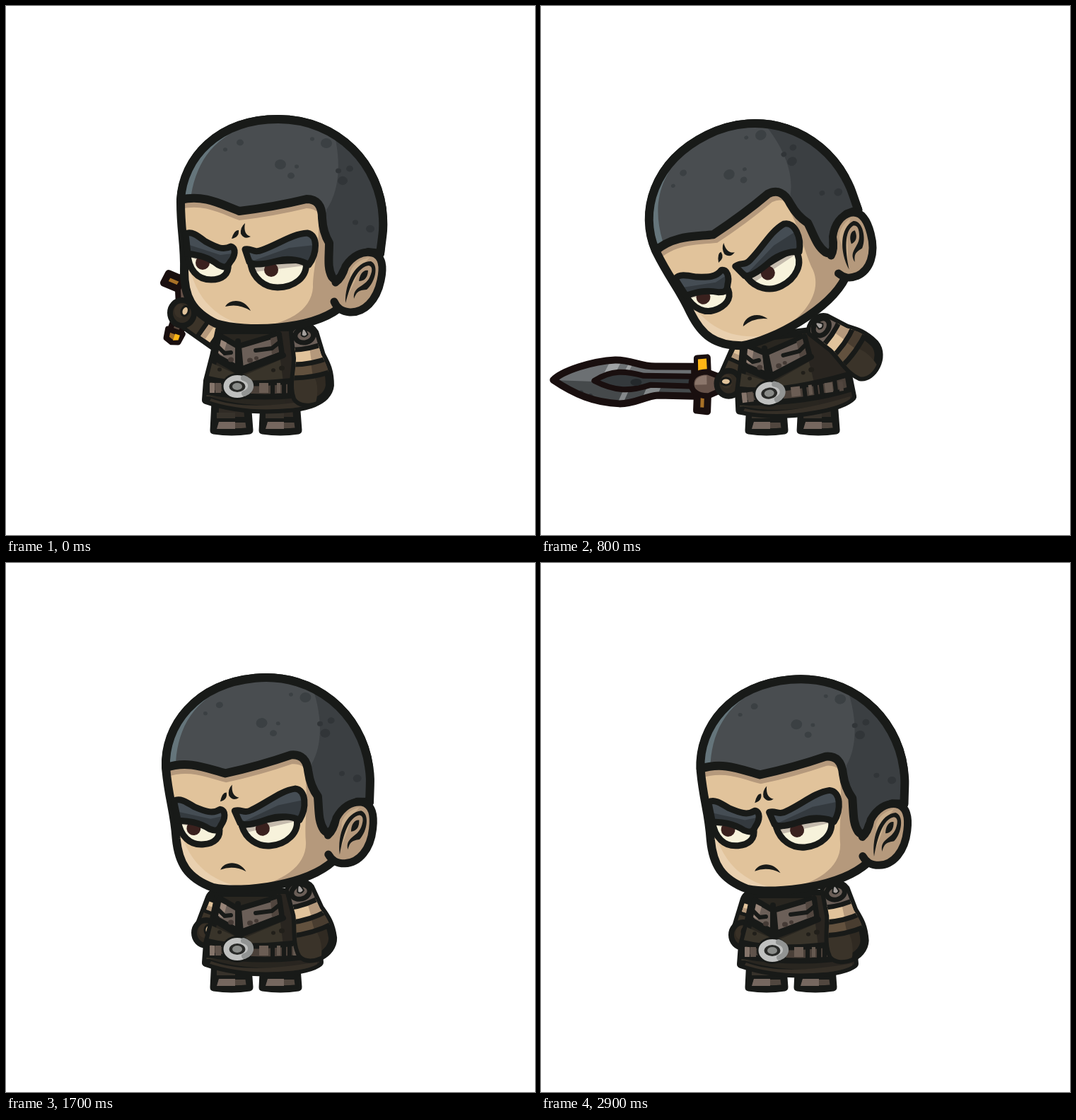
An HTML page with a canvas for the animation above (3 s loop, 748 by 748 pixels).

```html
<!DOCTYPE html>
<html>
<head>
<meta charset="utf-8">
<style>
html, body { margin: 0; width: 100%; height: 100%; overflow: hidden; background: #fff; }
canvas { display: block; width: 748px; height: 748px; }
</style>
</head>
<body>
<canvas id="stage" width="748" height="748"></canvas>
<script>
const ctx = document.getElementById('stage').getContext('2d');
const INK = '#181a18', SKIN = '#e1c39b', SKIN_DARK = '#b5997c', LEATHER = '#6b5f58';
const LOOP = 3000, STEP = 100;

// time, head x y angle, body x y angle, near arm x y angle, far hand x y, sword angle
const KEYS = [
  [0, 328, 424, 0, 327, 538, 0, 422, 468, -8, 249, 434, 20],
  [300, 297, 441, -23, 323, 547, -9, 395, 455, -55, 231, 497, -27],
  [600, 294, 452, -34, 322, 550, -10, 390, 452, -65, 261, 540, -90],
  [1000, 311, 434, -15.5, 324, 545, -3, 408, 460, -37, 268, 522, -82],
  [1200, 319, 433, -7, 326, 547, -1, 415, 467, -18, 281, 527, -78],
  [1700, 321, 431, -5.5, 327, 546, 0, 417, 467, -16, 283, 523, 0],
  [2100, 323, 426, -2.6, 327, 543, 0, 417, 465, -18, 279, 519, 0],
  [2300, 323, 426, -2.3, 327, 543, 0, 417, 465, -18, 279, 519, 0],
  [2900, 320, 433, -5.3, 327, 548, 0, 417, 468, -12, 286, 526, 0]
];

function pose(t) {
  let i = 0;
  while (i < KEYS.length - 2 && t >= KEYS[i + 1][0]) i++;
  const a = KEYS[i], b = KEYS[i + 1], before = KEYS[i - 1] || a, after = KEYS[i + 2] || b;
  const span = b[0] - a[0], u = Math.min(1, (t - a[0]) / span), v = 1 - u;
  return a.map((p, k) => {
    const m = (b[k] - before[k]) / (b[0] - before[0]) * span;
    const n = (after[k] - a[k]) / (after[0] - a[0]) * span;
    return p * v * v * (1 + 2 * u) + b[k] * u * u * (3 - 2 * u) + m * u * v * v - n * u * u * v;
  });
}

function shape(d, fill, width = 0, stroke = INK) {
  const path = new Path2D(d);
  if (fill) { ctx.fillStyle = fill; ctx.fill(path); }
  if (width) { ctx.lineWidth = width; ctx.strokeStyle = stroke; ctx.stroke(path); }
}

function oval(x, y, rx, ry, fill, width = 0, stroke = INK) {
  ctx.beginPath();
  ctx.ellipse(x, y, rx, ry, 0, 0, Math.PI * 2);
  if (fill) { ctx.fillStyle = fill; ctx.fill(); }
  if (width) { ctx.lineWidth = width; ctx.strokeStyle = stroke; ctx.stroke(); }
}

function dots(fill, list) {
  for (const [x, y, r] of list) oval(x, y, r, r * 0.88, fill);
}

// Draws with (ox, oy) moved to (x, y) and turned around that point.
function placed(x, y, angle, ox, oy, draw) {
  ctx.save();
  ctx.translate(x, y);
  ctx.rotate(angle * Math.PI / 180);
  ctx.translate(-ox, -oy);
  draw();
  ctx.restore();
}

function clipped(d, draw) {
  ctx.save();
  ctx.clip(new Path2D(d));
  draw();
  ctx.restore();
}

function trail() {
  clipped('M0 190H245V546L22 535L0 534Z', () => {
    oval(265, 460, 254, 254, '#a9a3a6');
    clipped('M11 460A254 254 0 0 1 519 460A254 254 0 0 1 11 460Z', () => {
      oval(281, 440, 240, 250, '#929096');
      oval(300, 450, 197, 200, '#737a7b');
    });
  });
}

function sword() {
  const edge = '#190f0f';
  const blade = 'M9 -248C22 -235 35 -192 36 -160C36 -135 25 -125 26 -100L25 -48H-17L-15 -100C-16 -120 -26 -130 -26 -155C-24 -190 -12 -218 9 -248Z';
  shape(blade, '#45494b');
  clipped(blade, () => {
    shape('M9 -250L45 -240V-40H6V-190Z', '#6c7073');
    shape('M10 -180L40 -164V-148L10 -164ZM10 -152L40 -136V-130L10 -146Z', '#a0a3a5');
    shape('M-30 -128L5 -112V-92L-30 -108ZM-30 -160L0 -146V-138L-30 -152Z', '#85898b');
    dots('#303437', [[-10, -209, 4], [-16, -196, 5]]);
  });
  shape('M7 -190C23 -165 20 -145 13 -120L11 -50H-3L0 -110C-9 -140 -9 -160 7 -190Z', '#34393c', 8, edge);
  oval(4, -131, 5, 8, '#24292c');
  shape(blade, null, 10, edge);
  shape('M-8 -22H8V34H-8Z', '#58483f', 8, edge);
  shape('M-39 -31L-37 -46L0 -44L36 -44L37 -30L0 -29Z', '#a87127', 10, edge);
  shape('M13 -43L35 -43L36 -31L13 -30Z', '#ffb515');
  shape('M-17 -29C-17 -48 -7 -53 0 -53C10 -53 17 -46 17 -30L9 -10H-9Z', '#665249', 8, edge);
  shape('M-1 -31V-48C7 -48 12 -42 12 -31Z', '#8b766b');
  shape('M-11 28H11L9 41L0 44L-9 41Z', '#a87127', 8, edge);
  shape('M1 31H8V38L1 41Z', '#ffb515');
}

function farArm(sx, sy, hx, hy) {
  const at = u => [sx + (hx - sx) * u, sy + (hy - sy) * u];
  const line = (a, b, width, color, cap) => {
    ctx.lineCap = cap;
    ctx.lineWidth = width;
    ctx.strokeStyle = color;
    ctx.beginPath();
    ctx.moveTo(...at(a));
    ctx.lineTo(...at(b));
    ctx.stroke();
  };
  line(0, 1, 38, INK, 'round');
  line(0.1, 0.36, 23, SKIN, 'butt');
  line(0.23, 0.36, 23, SKIN_DARK, 'butt');
  line(0.36, 0.46, 29, INK, 'butt');
  line(0.46, 0.72, 27, '#3c3429', 'butt');
  line(0.72, 0.8, 30, INK, 'butt');
  ctx.lineCap = 'round';
  oval(hx, hy, 17, 18, '#302a22', 8);
  oval(hx - 3, hy - 3, 8, 10, '#393127');
}

function legs(shift) {
  const boot = x => {
    shape(`M${x + 7} 560H${x + 52}L${x + 55} 600Q${x + 30} 604 ${x + 5} 600Z`, '#302b25', 11);
    shape(`M${x + 9} 585H${x + 53}L${x + 55} 600Q${x + 28} 603 ${x + 5} 599Z`, '#51473f', 8);
    shape(`M${x + 12} 588H${x + 35}V598H${x + 9}Z`, '#75675f');
    shape(`M${x + 9} 575H${x + 35}V583H${x + 9}Z`, '#37322b');
  };
  boot(289);
  boot(358 + shift);
}

function torso() {
  const coat = 'M302 458L294 495L285 530L283 557Q330 573 385 570Q430 568 443 557L440 520L412 458Z';
  shape(coat, '#292620', 12);
  clipped(coat, () => {
    shape('M280 500L333 524L400 495V552H280Z', '#39342a');
    shape('M383 460H450V580H398Z', '#292520');
    shape('M290 555Q340 574 440 556V565Q350 578 285 564Z', '#352f27');
    dots('#211f1a', [[378, 515, 3], [390, 512, 4], [302, 514, 3]]);
  });
  shape('M302 466L328 481V512L297 495Z', LEATHER, 8);
  shape('M329 481L386 464L390 492L332 514Z', LEATHER, 8);
  shape('M304 472L312 476L307 494L300 491Z', '#978478');
  shape('M374 470L383 467L386 489L376 493Z', '#51463f');
  shape('M300 482L309 491L318 490M386 476L376 484L353 487', null, 6);
  dots('#453b36', [[318, 500, 4], [345, 501, 4], [354, 498, 3]]);
  shape('M328 474V518M296 498L330 518L392 494', null, 8);
  shape('M285 527Q340 541 440 525L441 546Q370 559 284 546Z', '#4a4039', 8);
  for (const [x, w, c] of [[288, 7, '#85756b'], [296, 8, '#5f534b'], [358, 13, '#6b5d54'], [383, 5, '#655950'], [406, 11, '#655950'], [426, 6, '#51463f']]) {
    shape(`M${x} 533H${x + w}V547H${x}Z`, c);
  }
  shape('M377 532V552M393 532V552M401 531V551M421 529V549', null, 6);
  oval(327, 538, 22, 19, INK);
  oval(327, 538, 15.5, 12, '#292a28', 8, '#bfc0bf');
  shape('M336 526A16 12 0 0 1 337 548', null, 8, '#929493');
  oval(327, 538, 7, 5, '#898b88');
}

function nearArm() {
  const limb = 'M-15 -9C-8 -18 10 -16 15 -4L20 28C25 42 29 52 26 73C20 96 -16 100 -24 84C-28 65 -19 47 -16 28Z';
  shape(limb, '#302a22', 12);
  clipped(limb, () => {
    shape('M-30 -20H30V17H-30Z', LEATHER);
    shape('M-30 14H30V36H-30Z', SKIN);
    shape('M5 14H30V36H5Z', SKIN_DARK);
    shape('M-30 36H35V54H-30Z', '#62513e');
    shape('M4 36H35V54H4Z', '#493d30');
    shape('M-30 54H5Q13 75 0 101H-30Z', '#3a3329');
    shape('M-30 14Q0 20 30 12M-30 35Q0 41 30 34M-30 54Q0 60 35 53', null, 7);
  });
  oval(0, -2, 13, 10, LEATHER, 7);
  shape('M-4 -3Q0 -20 5 -3Q0 2 -4 -3Z', '#a5a09d', 2);
}

const HEAD = 'M247 277C250 215 300 160 385 160C470 160 530 225 533 300L529 350L470 428C430 458 340 462 297 449C262 432 252 410 252 375C253 335 247 320 247 277Z';
const HAIR = 'M247 274C280 266 305 281 330 290Q380 284 425 273Q447 273 447 300Q448 320 457 335C457 355 454 370 461 383Q467 391 474 382Q485 355 512 348L529 350C533 320 534 315 533 300C530 225 470 160 385 160C300 160 250 215 247 274Z';

function eyes() {
  const left = 'M257 350C272 350 298 355 314 364C316 380 305 387 290 387C270 387 258 372 257 350Z';
  const right = 'M346 366C370 362 400 358 424 360C428 385 405 398 384 398C365 398 350 385 346 366Z';
  for (const [d, x, y, lid] of [[left, 278, 363, 'M255 345L316 355V372L258 355Z'], [right, 375, 373, 'M342 355H430V366L345 377Z']]) {
    shape(d, '#f7f2db');
    clipped(d, () => {
      shape(lid, '#c5bbad');
      oval(x, y, 10, 10, '#3a211e');
    });
    shape(d, null, 9);
  }
  const brows = ['M254 322C262 318 270 324 282 333C297 341 307 346 318 340C326 342 324 354 317 362C312 371 308 370 300 366C285 354 270 352 257 350Z',
    'M338 344C348 342 350 350 362 345C385 337 405 322 426 321C442 324 440 350 428 366C420 360 400 356 385 360C370 364 352 368 344 362Z'];
  for (const d of brows) {
    shape(d, '#343a3f');
    clipped(d, () => shape('M250 315L303 345L320 343V350L303 352L253 336ZM335 342L350 350L400 328L445 318V337L400 342L350 360Z', '#454d54'));
    shape(d, null, 9);
  }
}

function ear() {
  const d = 'M466 391Q475 385 480 368C490 353 504 346 518 349C533 353 534 370 530 388C524 417 506 434 486 433C474 432 468 427 464 418';
  shape(d, SKIN_DARK);
  shape('M487 375Q494 359 514 356Q500 369 493 390L484 408Z', '#c9ad8b');
  shape(d, null, 11);
  shape('M480 420C479 390 495 361 516 361C528 366 522 391 510 401C498 402 496 404 492 414C490 396 507 398 514 384Q521 369 513 367C498 368 487 393 480 420Z', INK);
  shape('M499 389C500 379 506 372 512 374Q511 389 499 389Z', INK);
}

function head() {
  shape(HEAD, SKIN);
  clipped(HEAD, () => {
    shape('M240 350H257C262 405 290 443 350 455V470H240Z', '#e9d0af');
    shape('M440 280C447 335 434 365 434 398C432 431 395 452 350 453V470H540V280Z', SKIN_DARK);
    ctx.save();
    ctx.translate(0, 13);
    shape(HAIR, SKIN_DARK);
    ctx.restore();
  });
  shape(HEAD, null, 12);
  shape(HAIR, '#494d50');
  clipped(HAIR, () => {
    shape('M455 150C477 210 473 260 453 288L440 400H550V150Z', '#3b3f42');
    shape('M245 270L262 266C270 220 295 180 355 166L300 155L240 220Z', '#65757b');
    dots('#3b4043', [[388, 224, 8], [403, 240, 5], [411, 227, 3], [331, 193, 5], [310, 203, 3], [453, 194, 8], [433, 188, 3]]);
    dots('#313538', [[476, 247, 7], [470, 233, 4], [486, 230, 5], [515, 315, 6], [494, 306, 4]]);
  });
  shape(HAIR, null, 12);
  ear();
  eyes();
  shape('M310 425C316 414 337 413 346 431Q329 420 310 425Z', INK);
  shape('M319 329Q323 316 329 317Q330 327 319 329ZM338 307Q335 323 346 326Q337 331 332 322Q331 313 338 307Z', INK);
}

function render(t) {
  const [, hx, hy, ha, bx, by, ba, ax, ay, aa, fx, fy, sa] = pose(t);
  ctx.fillStyle = '#fff';
  ctx.fillRect(0, 0, 748, 748);
  ctx.lineJoin = ctx.lineCap = 'round';

  if (t >= 300 && t <= 600) trail();
  if (t < 1200) placed(fx, fy, sa, 0, 0, sword);

  const turn = ba * Math.PI / 180, c = Math.cos(turn), s = Math.sin(turn);
  farArm(bx - 27 * c + 68 * s, by - 27 * s - 68 * c, fx, fy);
  placed(fx, fy, sa, 0, 0, () => oval(3, -4, 5, 7, SKIN, 3));

  legs(-ba * 0.6);
  placed(bx, by, ba, 327, 538, torso);
  placed(ax, ay, aa, 0, 0, nearArm);
  placed(hx, hy, ha, 328, 424, head);
}

function tick(now) {
  render(Math.floor(now % LOOP / STEP) * STEP);
  requestAnimationFrame(tick);
}
tick(0);
</script>
</body>
</html>
```
